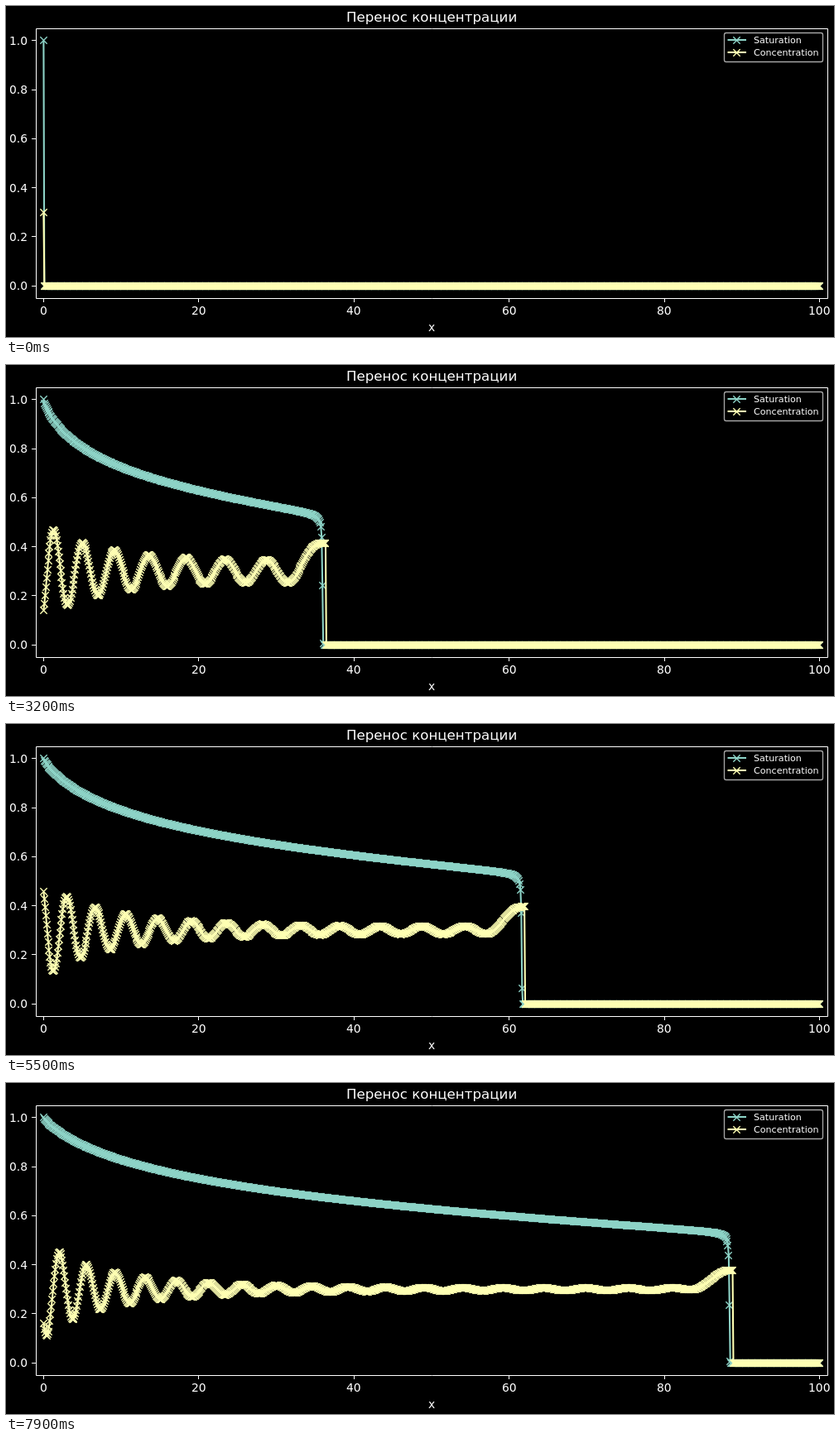
An HTML page with a canvas for the animation above (8000 ms loop, 1000 by 400 pixels).

```html
<!DOCTYPE html>
<html lang="ru">
<head>
<meta charset="utf-8">
<title>Перенос концентрации</title>
<style>
html, body { margin: 0; width: 100%; height: 100%; overflow: hidden; background: #000; }
canvas { display: block; }
</style>
</head>
<body>
<canvas id="stage" width="1000" height="400"></canvas>
<script>
const ctx = document.getElementById('stage').getContext('2d');
const TEAL = '#8dd3c7', YELLOW = '#feffb3', FONT = '"DejaVu Sans", sans-serif';
const FRAMES = 80, FRAME_MS = 100, STEPS = 30;
const N = 1000, DX = 100 / (N - 1), CFL = 0.25, DT = CFL * DX;

const toX = x => 45.4 + 9.372 * x;
const toY = y => 338.2 - 296.4 * y;
const snap = v => Math.floor(v) + 0.5;

// Fraction of water in the flow at saturation s
function flow(s) {
  const water = s ** 2.5;
  return water / (water + 0.25 * (1 - s) ** 2);
}

// Upwind two-phase displacement with a tracer that oscillates at the inlet
function simulate() {
  const s = new Float64Array(N), c = new Float64Array(N), f = new Float64Array(N);
  const states = [];
  s[0] = 1;
  c[0] = 0.3;
  let front = 1;
  for (let step = 0; step < FRAMES * STEPS; step++) {
    if (step % STEPS === 0) states.push({ s: s.slice(), c: c.slice() });
    for (let i = 0; i <= front; i++) f[i] = flow(s[i]);
    for (let i = front; i > 0; i--) {
      s[i] += CFL * (f[i - 1] - f[i]);
      if (s[i] > 0) c[i] += CFL * f[i - 1] * (c[i - 1] - c[i]) / s[i];
    }
    if (s[front] > 0 && front < N - 1) front++;
    c[0] = 0.3 + 0.2 * Math.sin(2 * (step + 1) * DT);
  }
  return states;
}

function cross(x, y) {
  const r = 4.17;
  x = snap(x);
  y = snap(y);
  ctx.lineWidth = 1.39;
  ctx.beginPath();
  ctx.moveTo(x - r, y - r);
  ctx.lineTo(x + r, y + r);
  ctx.moveTo(x - r, y + r);
  ctx.lineTo(x + r, y - r);
  ctx.stroke();
}

function curve(values, color) {
  const points = Array.from(values, (v, i) => [toX(i * DX), toY(v)]);
  ctx.strokeStyle = color;
  ctx.lineWidth = 2.08;
  ctx.lineJoin = 'round';
  ctx.beginPath();
  for (const [x, y] of points) ctx.lineTo(x, y);
  ctx.stroke();
  for (const [x, y] of points) cross(x, y);
}

// Text on whole pixels; anchor is 0 for left, 0.5 for centre, 1 for right
function text(str, x, y, size, anchor = 0.5) {
  ctx.font = `${size}px ${FONT}`;
  ctx.fillStyle = '#fff';
  ctx.fillText(str, Math.round(x - anchor * ctx.measureText(str).width), Math.round(y));
}

function line(x1, y1, x2, y2) {
  ctx.beginPath();
  ctx.moveTo(x1, y1);
  ctx.lineTo(x2, y2);
  ctx.stroke();
}

function axes() {
  ctx.strokeStyle = '#fff';
  ctx.lineWidth = 1;
  ctx.strokeRect(36.5, 27.5, 956, 326);
  for (let i = 0; i <= 5; i++) {
    const x = toX(20 * i), y = toY(i / 5);
    line(snap(x), 353, snap(x), 358);
    line(31, snap(y), 36, snap(y));
    text(String(20 * i), x, 373, 13.89);
    text((i / 5).toFixed(1), 26.5, y + 5, 13.89, 1);
  }
  text('x', 514, 393, 13.89);
  text('Перенос концентрации', 514, 18.65, 16.67);
}

function legend() {
  ctx.beginPath();
  ctx.roundRect(867.5, 32.5, 119, 35, 2.2);
  ctx.fillStyle = 'rgba(0,0,0,0.8)';
  ctx.fill();
  ctx.strokeStyle = 'rgba(204,204,204,0.8)';
  ctx.lineWidth = 1.39;
  ctx.stroke();
  [['Saturation', TEAL, 41], ['Concentration', YELLOW, 56]].forEach(([name, color, y]) => {
    ctx.strokeStyle = color;
    ctx.lineWidth = 2.08;
    line(871.5, y, 894, y);
    cross(882.8, y);
    text(name, 903, y + 4, 11.11, 0);
  });
}

const states = simulate();
let shown = -1;

function draw() {
  const k = Math.floor(performance.now() / FRAME_MS) % FRAMES;
  if (k !== shown) {
    shown = k;
    ctx.fillStyle = '#000';
    ctx.fillRect(0, 0, 1000, 400);
    curve(states[k].s, TEAL);
    curve(states[k].c, YELLOW);
    axes();
    legend();
  }
  requestAnimationFrame(draw);
}
draw();
</script>
</body>
</html>
```
